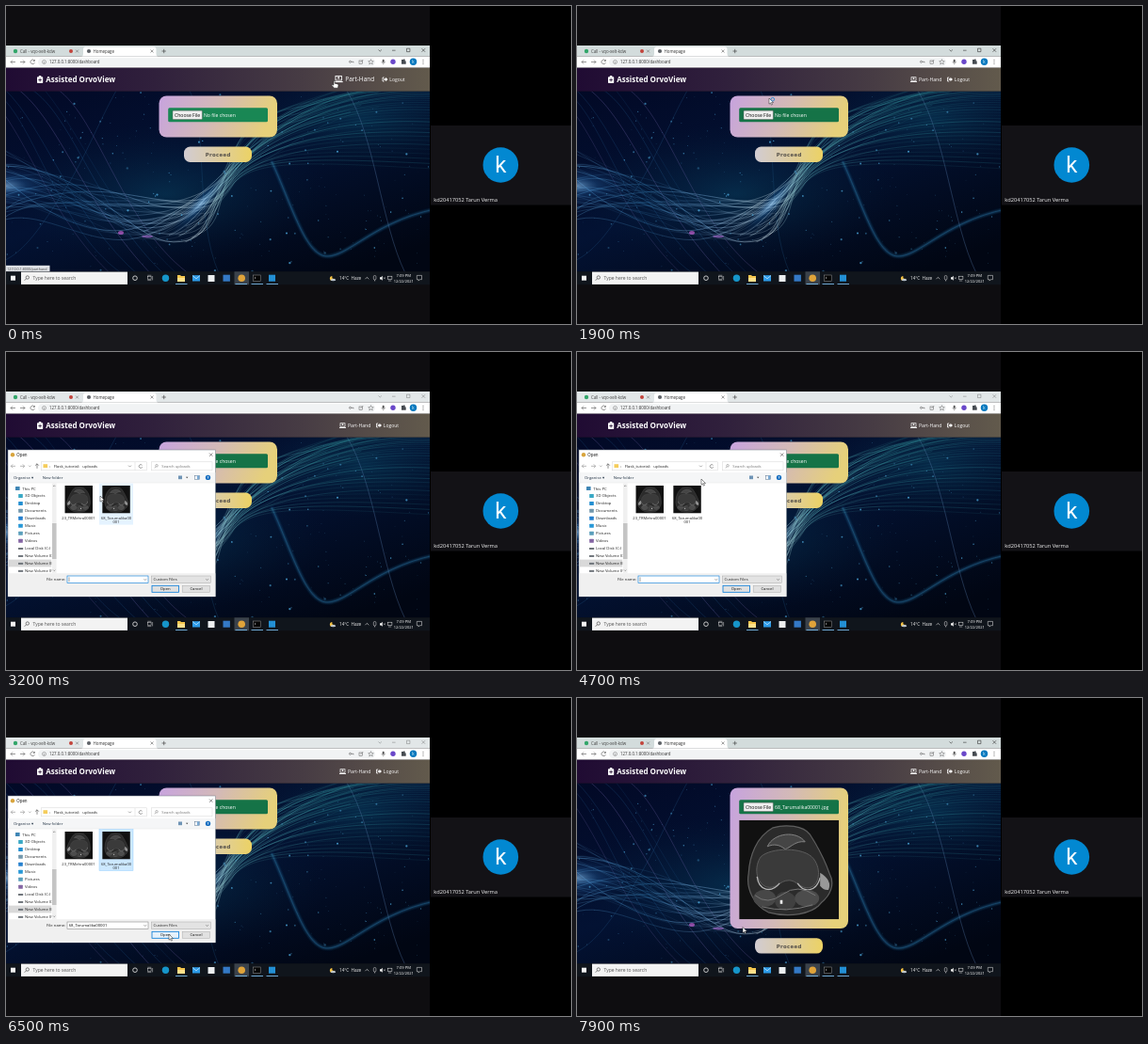
Write an HTML page that moves like this. It is 600 px wide and 338 px high and loops after 8 s.

```html
<!DOCTYPE html>
<html lang="en">
<head>
<meta charset="utf-8">
<title>Upload walkthrough</title>
<style>
html, body { margin: 0; width: 100%; height: 100%; overflow: hidden; background: #000; }
svg { display: block; width: 100vw; height: 100vh; font-family: "Open Sans", "Noto Sans", sans-serif; }
</style>
</head>
<body>
<svg id="stage" viewBox="0 0 600 338" preserveAspectRatio="none"></svg>
<script>
const LOOP = 8000;
const stage = document.getElementById('stage');

// Markup helpers
const rect = (x, y, w, h, fill, more = '') => `<rect x="${x}" y="${y}" width="${w}" height="${h}" fill="${fill}" ${more}/>`;
const disc = (x, y, r, fill, more = '') => `<circle cx="${x}" cy="${y}" r="${r}" fill="${fill}" ${more}/>`;
const oval = (x, y, rx, ry, fill, more = '') => `<ellipse cx="${x}" cy="${y}" rx="${rx}" ry="${ry}" fill="${fill}" ${more}/>`;
const line = (d, color, w = .6, more = '') => `<path d="${d}" fill="none" stroke="${color}" stroke-width="${w}" ${more}/>`;
const shape = (d, fill, more = '') => `<path d="${d}" fill="${fill}" ${more}/>`;
const text = (x, y, size, str, fill = '#222', more = '') => `<text x="${x}" y="${y}" font-size="${size}" fill="${fill}" ${more}>${str}</text>`;
const group = (id, body, more = '') => `<g id="${id}" ${more}>${body}</g>`;
const stops = list => list.map(([o, c, a = 1]) => `<stop offset="${o}" stop-color="${c}" stop-opacity="${a}"/>`).join('');
const fade = (id, list, more = '') => `<linearGradient id="${id}" ${more}>${stops(list)}</linearGradient>`;
const glow = (id, list) => `<radialGradient id="${id}">${stops(list)}</radialGradient>`;
const mid = 'text-anchor="middle"';

let seed = 11;
const rnd = () => (seed = (seed * 16807) % 2147483647) / 2147483647;
const span = (a, b) => +(a + (b - a) * rnd()).toFixed(2);

const defs = `<defs>
${fade('nav', [[0, '#200b33'], [.35, '#30203c'], [.7, '#473c44'], [1, '#625a4c']])}
${fade('card', [[0, '#c7a3de'], [.5, '#d3b9b8'], [1, '#e6d07a']], 'x2="1" y2=".15"')}
${fade('pill', [[0, '#d2ccd2'], [.45, '#dccca6'], [1, '#ecd264']])}
${fade('sky', [[0, '#020926'], [.5, '#031233'], [1, '#010613']], 'x2=".8" y2="1"')}
${fade('strand', [[0, '#5fa8dc'], [.16, '#2f74a8'], [.3, '#7fb4e2'], [.46, '#eafcff'], [.56, '#5cb9c0'], [.75, '#2b8791'], [1, '#1c6378']],
  'gradientUnits="userSpaceOnUse" x1="0" y1="0" x2="450" y2="0"')}
${glow('halo', [[0, '#8cc4f4', .65], [.35, '#2f78c0', .3], [1, '#06255a', 0]])}
${glow('teal', [[0, '#0a4a66', .45], [1, '#062038', 0]])}
<filter id="soft"><feGaussianBlur stdDeviation=".6"/></filter>
<filter id="haze"><feGaussianBlur stdDeviation="1.2"/></filter>
<clipPath id="page">${rect(0, 90.5, 450, 192, '#fff')}</clipPath>
<clipPath id="side">${rect(3, 140, 45.5, 95, '#fff')}</clipPath>
<clipPath id="frame">${rect(0, 0, 106, 105.5, '#fff')}</clipPath>
</defs>`;

function wallpaper() {
  const alpha = (a, b) => `opacity="${span(a, b)}"`;
  let s = rect(0, 90, 450, 193, 'url(#sky)');
  s += oval(170, 200, 170, 75, 'url(#teal)') + oval(380, 120, 130, 55, 'url(#teal)');

  // Faint crossing threads
  for (let i = 0; i < 7; i++) {
    const x = i * 14 - 30;
    s += line(`M${x},88 C${x + 45},${span(110, 150)} ${x + 70},${span(200, 250)} ${x + 145},288`, i % 3 ? '#2a6ca4' : '#8d7cc9', .5, alpha(.25, .6));
  }
  s += line('M118,88 C95,130 85,160 62,196 S20,262 -5,272', '#2f6ea0', .5, 'opacity=".45"');
  s += line('M282,165 C303,210 318,266 341,266 S390,230 455,216', '#1d5a86', 2.6, 'opacity=".65" filter="url(#haze)"');
  s += line('M282,165 C303,210 318,266 341,266 S390,230 455,216', '#2a6f96', .6, 'opacity=".6"');
  s += line('M362,90 C392,140 398,230 424,284', '#5a7fae', .5, 'opacity=".7"');
  s += line('M195,90 C215,130 200,225 226,284', '#24608f', .5, 'opacity=".5"');

  // Main ribbon: loose on both ends, gathered around x = 230
  for (let i = 0; i < 32; i++) {
    const k = i / 31, low = span(206, 252), dip = span(115, 185), knot = 166 + k * 26, end = 88 + k * k * 85;
    s += line(`M-5,${span(150, 230)} C${dip - 90},${span(160, 215)} ${dip - 45},${low} ${dip},${low} S${span(205, 222)},${knot + 32} 240,${knot} S${span(310, 355)},${end - 6} 455,${end}`,
      'url(#strand)', span(.3, .8), alpha(.12, .65));
  }
  for (let i = 0; i < 16; i++) {
    const x = span(140, 205), y = span(225, 252), up = span(88, 125);
    s += line(`M${x},${y} C${x + 30},${y - 12} 222,${span(188, 205)} ${span(240, 262)},${span(150, 178)} S${span(290, 320)},${up + 8} ${span(340, 400)},${up - 10}`,
      'url(#strand)', span(.3, .8), alpha(.2, .65));
  }
  s += oval(0, 191, 62, 24, 'url(#halo)');
  s += oval(207, 210, 46, 10, 'url(#halo)', 'transform="rotate(-48 207 210)"');
  s += oval(122, 241, 3, 2, '#c35fd0', 'opacity=".7" filter="url(#soft)"') + oval(150, 245, 6, 1.5, '#b070d8', 'opacity=".6" filter="url(#soft)"');
  for (let i = 0; i < 280; i++)
    s += disc(span(0, 450), span(91, 282), (.3 + rnd() ** 3 * .9).toFixed(2), '#4aa3d6', alpha(.3, .9));
  return `<g clip-path="url(#page)">${s}</g>`;
}

// Soft cross-section of a knee in a 106 px square
function knee(place) {
  return `<g transform="${place}"><g clip-path="url(#frame)">` + rect(0, 0, 106, 105.5, '#111') + '<g filter="url(#soft)">' +
    shape('M36,8 C50,4 68,6 75,15 C84,29 91,42 96,57 C102,68 97,80 87,88 C78,100 53,104 31,98 C16,91 7,73 10,57 C11,38 18,18 36,8Z', '#2b2b2b', 'stroke="#5e5e5e" stroke-width="1.2"') +
    shape('M30,28 C37,13 61,11 70,23 C60,22 56,28 49,31 C43,26 37,25 30,28Z', '#454545', 'stroke="#8a8a8a" stroke-width=".9"') +
    shape('M23,39 C33,29 69,28 79,41 C88,53 85,70 74,72 C65,73 61,64 53,64 C43,64 39,74 29,71 C17,66 16,49 23,39Z', '#3a3a3a', 'stroke="#5c5c5c" stroke-width="1"') +
    line('M19,60 C21,75 34,78 43,67 M62,67 C69,78 82,76 86,61', '#b5b5b5', 1.3) +
    oval(27, 83, 12, 9, '#474747') + oval(49, 86, 11, 10, '#404040') + oval(72, 83, 13, 9, '#4c4c4c') +
    line('M17,80 Q30,91 46,79 T81,80 M24,92 Q50,99 78,90', '#757575', 1) +
    shape('M86,56 Q99,64 95,74 Q90,75 86,70Z', '#999') + '</g>' +
    rect(43.5, 85, 2.6, 4, '#f0f0f0') + '</g></g>';
}

function browser() {
  let s = group('strip', rect(0, 42, 450, 11.5, '#d3dcdc'));
  s += disc(10, 48, 2.2, '#33a66a') + text(15, 49.8, 4.4, 'Call - vqo-xelt-kdw', '#444');
  s += disc(69, 48, 2, '#c2443b') + line('M74,46.5l3,3m0,-3l-3,3', '#555', .5);
  s += shape('M80,53.5 Q82,53.5 82,51 V46 Q82,43.5 84.5,43.5 H157 Q159.5,43.5 159.5,46 V51 Q159.5,53.5 161.5,53.5Z', '#fff');
  s += disc(88, 48, 2.1, '#5f6368') + text(92.5, 49.7, 4.4, 'Homepage', '#333') + line('M153.5,46.5l3,3m0,-3l-3,3', '#444', .5);
  s += line('M165.5,48h4.4m-2.2,-2.2v4.4', '#333', .6);
  s += group('controls', line('M395.5,46.5l1.7,1.6l1.7,-1.6 M410,47.2h3.6 M425.5,45.2h3.4v3.4h-3.4z M441.5,45.2l3.6,3.6m0,-3.6l-3.6,3.6', '#333', .6));
  s += rect(0, 53.5, 450, 12.2, '#fff') + rect(34, 55.2, 358, 8.8, '#f1f3f4', 'rx="4.4"');
  s += line('M10,59.5H5m2,-2l-2,2l2,2 M15,59.5h5m-2,-2l2,2l-2,2', '#555', .6);
  s += line('M30.2,58a2.3,2.3 0 1 0 .3,2.2 M30.4,56.9v1.6h-1.6', '#555', .6);
  s += disc(40.5, 59.5, 2, 'none', 'stroke="#666" stroke-width=".5"') + line('M40.5,59v1.7', '#666', .5);
  s += text(46, 61.2, 4.4, '127.0.0.1:8000/dashboard', '#333');
  s += disc(365.5, 59.3, 1, 'none', 'stroke="#555" stroke-width=".6"') + line('M366.5,59.3h2.5v1', '#555', .6);
  s += rect(375, 58, 3.3, 3.3, 'none', 'stroke="#555" stroke-width=".5"') + line('M376.5,60l2.8,-3', '#555', .5);
  s += shape('M387.5,56.7l.8,1.9 2,.1 -1.6,1.3 .6,2 -1.8,-1.1 -1.8,1.1 .6,-2 -1.6,-1.3 2,-.1Z', 'none', 'stroke="#555" stroke-width=".45"');
  s += rect(399.7, 56.7, 2, 3.4, '#555', 'rx="1"') + line('M398.9,59a1.8,1.8 0 0 0 3.6,0 M400.7,61v1.3', '#555', .45);
  s += disc(411, 59.3, 2.7, '#6a48c9') + shape('M420,57h2a1,1 0 0 1 1.7,0v1.4h1v3.4h-4.7z', '#454a50');
  s += disc(432.5, 59.3, 3.7, '#0277bd') + text(432.5, 60.9, 4.4, 'k', '#fff', mid);
  s += disc(443, 57.3, .5, '#444') + disc(443, 59.3, .5, '#444') + disc(443, 61.3, .5, '#444');
  return s;
}

function navbar() {
  return rect(0, 65.7, 450, 24.9, 'url(#nav)') +
    rect(33, 75.2, 6.2, 6.8, '#fff', 'rx=".8"') + rect(34.8, 73.9, 2.6, 1.8, '#fff', 'rx=".5"') + line('M36.1,76.8v3.6m-1.8,-1.8h3.6', '#332040', .9) +
    text(42.3, 81.2, 8, 'Assisted OrvoView', '#fff', 'font-weight="700"') +
    group('modeLink', rect(1, -4.6, 5, 3.6, 'none', 'stroke="#fff" stroke-width=".7"') + disc(3.5, -3.1, .9, '#fff') +
      line('M0,.2h7', '#fff', .9) + text(9, 0, 5.1, 'Part-Hand', '#fff')) +
    group('exitLink', line('M2.2,-4.3h-1.7v4h1.7', '#fff', .8) + shape('M1.7,-3h1.8v-1.5l2.5,2.2 -2.5,2.2v-1.5h-1.8z', '#fff') + text(7.8, 0, 5, 'Logout', '#fff'));
}

function form() {
  return `<rect id="panel" x="162.5" y="95.5" width="125.5" height="44" rx="8" fill="url(#card)"/>` +
    `<rect id="bar" x="172.2" y="108.3" width="105.8" height="15" rx="1.5"/>` +
    rect(177, 111.2, 31.3, 9.3, '#efefef', 'stroke="#666" stroke-width=".5" rx=".7"') +
    text(192.6, 117.8, 5.1, 'Choose File', '#111', mid) +
    `<text id="picked" x="210" y="117.8" font-size="5.1" fill="#fff"></text>` +
    group('scan', knee('translate(172.2 129.8)')) +
    group('proceed', rect(189, 149.6, 72, 16.4, 'url(#pill)', 'rx="6.5"') +
      text(225.2, 160, 5.4, 'Proceed', '#55504a', `${mid} font-weight="700" letter-spacing=".3" style="font-family:'DejaVu Sans',sans-serif"`));
}

function taskbar() {
  let s = rect(0, 282.3, 450, 13.9, '#10151c');
  s += rect(5, 286.7, 5, 5, '#f4f4f4');
  s += rect(16, 282.6, 113, 13.3, '#f3f3f3') + disc(22.8, 288.5, 1.7, 'none', 'stroke="#333" stroke-width=".6"') + line('M21.5,289.8l-1.8,1.9', '#333');
  s += text(28.5, 291, 5, 'Type here to search', '#555');
  s += disc(137, 289.2, 2.3, 'none', 'stroke="#eee" stroke-width=".8"');
  s += rect(150.5, 287.6, 3.6, 2.6, 'none', 'stroke="#ddd" stroke-width=".5"') + line('M150.3,286.3h4M150.3,291.6h4M155.6,287v4.4', '#ddd', .5);
  s += disc(169.5, 289.2, 3.7, '#1695c9');
  s += shape('M182,286h3l1,1h4v6h-8z', '#f4c64e') + rect(182, 289, 8, 4, '#ffe08a');
  s += rect(198, 286.2, 8, 6.3, '#2d9be8') + line('M198,286.5l4,3.3l4,-3.3', '#d9efff', .7);
  s += rect(214.5, 286, 7, 7, '#eceff1') + rect(230.5, 285.7, 7.4, 7, '#3479c5');
  s += rect(242.5, 282.3, 15.5, 13.9, '#3b424b') + disc(250.2, 289.2, 3.8, '#e0a33a');
  s += rect(262.6, 286, 7.6, 6.4, '#050505', 'stroke="#999" stroke-width=".5"') + line('M264,288l1.2,1l-1.2,1', '#eee', .5);
  s += rect(279, 285.7, 7, 7, '#238fd4');
  for (const x of [180, 243.5, 260.5, 276.5]) s += rect(x, 295.1, 12.5, .9, '#79b9e8');
  s += disc(346.5, 289.5, 2.6, '#f6c344') + disc(348.2, 288, 2, '#10151c') + oval(347.5, 291.2, 2.7, 1.1, '#bcc6d1');
  s += text(354, 291, 4.6, '14°C&#160; Haze', '#f2f2f2');
  s += line('M381.5,290.2l1.9,-1.9l1.9,1.9', '#eee', .6);
  s += rect(390.3, 286.5, 2.6, 4.5, 'none', 'rx="1.2" stroke="#eee" stroke-width=".5"') + line('M391.6,291v1.5', '#eee', .5);
  s += shape('M397,288.2h1.3l1.5,-1.4v5l-1.5,-1.4h-1.3z', '#eee') + line('M401,288.4l1.8,1.8m0,-1.8l-1.8,1.8', '#eee', .45);
  s += rect(405.3, 287.2, 4.6, 3.3, 'none', 'stroke="#eee" stroke-width=".5"') + line('M406,292h3.2', '#eee', .5);
  s += text(422.3, 287.8, 4.2, '7:09 PM', '#fff', mid) + text(422.3, 293.6, 4, '12/22/2021', '#fff', mid);
  s += shape('M436.3,286.4h5.2v4.3h-2.1l-1.3,1.4v-1.4h-1.8z', 'none', 'stroke="#eee" stroke-width=".5"');
  return s;
}

function dialog() {
  const small = 4.25;
  let s = rect(2, 104, 220.5, 156, '#fff', 'stroke="#6f7a82" stroke-width=".5"');
  s += disc(7, 109.3, 2.2, '#d8a43c') + text(11.3, 111, 4.4, 'Open', '#111') + line('M216,107.5l3.4,3.4m0,-3.4l-3.4,3.4', '#222', .5);
  s += line('M10,121.3H5.3m1.9,-1.9l-1.9,1.9l1.9,1.9 M15,121.3h4.7m-1.9,-1.9l1.9,1.9l-1.9,1.9', '#888', .6);
  s += line('M24,120.6l1.3,1.3l1.3,-1.3', '#777', .5) + line('M33,123.8v-5m-1.9,1.9l1.9,-1.9l1.9,1.9', '#444', .6);
  s += rect(37.5, 116.8, 112, 9, '#fff', 'stroke="#d5d5d5" stroke-width=".5"') + rect(39.5, 119.2, 4.6, 3.8, '#f5cd5b');
  s += text(46, 122.8, small, '›', '#555') + text(50.8, 122.8, small, 'Flask_tutorial') + text(77, 122.8, small, '›', '#555') + text(81.3, 122.8, small, 'uploads');
  s += line('M130,120.6l1.5,1.5l1.5,-1.5', '#555', .5) + line('M137,117v8.6', '#d5d5d5', .5) + line('M144.5,120.4a1.8,1.8 0 1 0 .2,1.8', '#444', .55);
  s += rect(154.5, 116.8, 64.5, 9, '#fff', 'stroke="#d5d5d5" stroke-width=".5"') + disc(160, 120.8, 1.3, 'none', 'stroke="#777" stroke-width=".5"') + line('M159,121.9l-1.3,1.4', '#777', .5);
  s += text(165.3, 122.8, small, 'Search uploads', '#777');
  s += rect(2.3, 128, 220, 11, '#f5f6f7') + line('M2.3,139h220', '#dedede', .4);
  s += text(8, 135, small, 'Organise ▾', '#223344') + text(38.7, 135, small, 'New folder', '#223344');
  s += rect(183, 131.5, 4, 3.7, '#6f94b5') + shape('M191,132.8h2.4l-1.2,1.4z', '#444');
  s += rect(200.3, 131.3, 5, 4, '#fff', 'stroke="#54708b" stroke-width=".5"') + rect(203, 131.3, 2.3, 4, '#79a8d3');
  s += disc(214.5, 133.4, 2.7, '#176fc1') + text(214.5, 135, 4.2, '?', '#fff', mid + ' font-weight="700"');

  const places = ['This PC', '3D Objects', 'Desktop', 'Documents', 'Downloads', 'Music', 'Pictures', 'Videos', 'Local Disk (C:)', 'New Volume (D:)', 'New Volume (E:)', 'New Volume (F:)'];
  const tints = ['#3f86b5', '#38a8c5', '#238ed1', '#7297ac', '#2680ce', '#2798d7', '#5a9ebb', '#8465a3'];
  const list = places.map((name, i) => {
    const y = 145 + i * 7.95;
    return (i === 10 ? rect(2.5, y - 3.9, 46, 7.8, '#d9d9d9') : '') +
      (i < 8 ? rect(i ? 13.2 : 10, y - 2, 4.6, 4, tints[i], 'rx=".5"') : rect(13, y - .6, 5.2, 2, '#70767c')) +
      text(i ? 20 : 17.3, y + 1.5, small, name);
  }).join('');
  s += `<g clip-path="url(#side)">${list}</g>`;
  s += rect(49, 139.5, 4.5, 95.5, '#f0f0f0') + rect(49, 182, 4.5, 38, '#c4c4c4') + line('M50,143l1.2,-1.2l1.2,1.2M50,231.5l1.2,1.2l1.2,-1.2', '#555', .5);

  s += `<rect id="tile" x="99" y="139.6" width="36" height="44" stroke-width=".5"/>`;
  s += knee('translate(92 142) scale(-.28 .28)') + knee('translate(102.2 142) scale(.28)');
  s += text(77, 177.6, 4.1, '23_TRMehra00001', '#222', mid) + text(117, 177.6, 4.1, '68_Tarumalika00', '#222', mid) + text(117, 182.3, 4.1, '001', '#222', mid);

  s += rect(2.3, 235.2, 220, 24.6, '#f0f0f0') + text(63.3, 243.4, small, 'File name:', '#222', 'text-anchor="end"');
  s += `<rect id="field" x="65" y="238" width="86" height="7.6" fill="#fff" stroke-width=".6"/>`;
  s += `<rect id="mark" x="66.3" y="239" width="37" height="5.6" fill="#0875d1"/>`;
  s += `<text id="entry" x="66.7" y="243.3" font-size="${small}"></text>` + line('M67,239.4v4.8', '#111', .4, 'id="caret"');
  s += line('M146.5,241.2l1.3,1.3l1.3,-1.3', '#444', .5);
  s += rect(154.3, 238, 63, 7.6, '#e3e3e3', 'stroke="#aaa" stroke-width=".5"') + text(156.5, 243.3, small, 'Custom Files') + line('M212.3,241.2l1.3,1.3l1.3,-1.3', '#444', .5);
  s += `<rect id="ok" x="155" y="248.3" width="28.5" height="7" stroke="#0078d7" stroke-width=".8"/>` + text(169.2, 253.3, small, 'Open', '#111', mid);
  s += rect(187.5, 248.3, 29, 7, '#e1e1e1', 'stroke="#adadad" stroke-width=".5"') + text(202, 253.3, small, 'Cancel', '#111', mid);
  return group('dialog', s);
}

const caller = rect(450, 0, 150, 338, '#000') + rect(451, 127, 149, 84.5, '#131216') + disc(525.3, 169, 18.8, '#0288d1') +
  text(525.3, 177.3, 24, 'k', '#fff', `${mid} style="font-family:Roboto,sans-serif"`) +
  text(454.3, 207.8, 5.7, 'kd20417052 Tarun Verma', '#f1f1f1');

const pointer = group('pointer',
  group('arrow', shape('M0,0V6.2L1.5,4.9 2.4,7.1 3.5,6.6 2.5,4.5H4.5Z', '#fff', 'stroke="#111" stroke-width=".45"')) +
  group('hand', shape('M0,0q1,-.6 1.2,.5v2.2l3,.7q.9,.3.8,1.3l-.5,3h-4l-2.6,-3q0,-1 1,-.7l1,.7z', '#fff', 'stroke="#111" stroke-width=".5"')) +
  group('busy', disc(3.8, 1.2, 1.8, 'none', 'stroke="#3c8fd0" stroke-width="1"')));

stage.innerHTML = defs + rect(0, 0, 450, 338, '#0e0d10') + wallpaper() + browser() + navbar() + form() +
  group('status', rect(0, 275.8, 46.5, 6.6, '#dfe2e6') + text(1.2, 280.6, 3.7, '127.0.0.1:8000/parthand', '#444')) +
  dialog() + taskbar() + caller + pointer;

const el = {};
stage.querySelectorAll('[id]').forEach(n => el[n.id] = n);

const set = (node, attrs) => { for (const k in attrs) node.setAttribute(k, attrs[k]); };
const show = (node, on) => node.setAttribute('visibility', on ? 'inherit' : 'hidden');
const clamp = v => Math.max(0, Math.min(1, v));
const ease = v => v * v * (3 - 2 * v);
const ramp = (t, a, b) => ease(clamp((t - a) / (b - a)));
const mix = (a, b, k) => a + (b - a) * k;

// Pointer stops: time, x, y
const route = [[0, 348, 79.5], [100, 348, 79.5], [900, 196, 114], [1500, 196, 114], [1900, 204, 98], [2400, 204, 98],
  [3100, 100, 153], [3600, 100, 153], [4000, 104, 128], [4200, 104, 128], [4700, 132, 135], [5150, 118, 158],
  [5600, 118, 158], [6400, 173, 251], [7200, 173, 251], [7300, 172.5, 250.5], [7600, 172.5, 250.5], [7900, 176, 243.5], [LOOP, 176, 243.5]];

function pointAt(t) {
  const i = route.findIndex((p, n) => n && t <= p[0]);
  const [a, b] = [route[i - 1], route[i]];
  const k = ramp(t, a[0], b[0]);
  return [mix(a[1], b[1], k), mix(a[2], b[2], k)];
}

function draw(t) {
  const [x, y] = pointAt(t);
  const link = t < 250;
  set(el.pointer, { transform: `translate(${x} ${y})` });
  show(el.hand, link);
  show(el.arrow, !link);
  show(el.busy, t >= 1500 && t < 2200);

  const hover = 1 - ramp(t, 200, 500);
  set(el.modeLink, { transform: `translate(${mix(354, 348.7, hover)} 80.3) scale(${mix(1, 1.28, hover)})` });
  set(el.exitLink, { transform: `translate(${mix(393, 399.5, hover)} 80.3)` });
  show(el.status, t < 600);

  const loaded = t >= 7600;
  set(el.bar, { fill: t < 1300 ? '#198754' : '#157347' });
  el.picked.textContent = loaded ? '68_Tarumalika00001.jpg' : 'No file chosen';
  set(el.panel, { height: loaded ? 149.5 : 44 });
  set(el.proceed, { transform: `translate(0 ${loaded ? 105.6 : 0})` });
  show(el.scan, loaded);

  const enter = ramp(t, 2150, 2350), leave = clamp((t - 7200) / 140);
  const open = t > 2150 && t < 7400;
  const size = leave ? 1 - .05 * leave : mix(.95, 1, enter);
  show(el.dialog, open);
  set(el.dialog, { opacity: enter * (1 - leave), transform: `translate(112 182) scale(${size}) translate(-112 -182)` });
  const inactive = open && t < 7200;
  set(el.strip.firstChild, { fill: inactive ? '#e2e7e8' : '#d3dcdc' });
  set(el.controls, { opacity: inactive ? .5 : 1 });

  const chosen = t >= 5300;
  const over = x >= 99 && x <= 135 && y >= 139.6 && y <= 183.6;
  set(el.tile, { fill: chosen ? '#cce8ff' : over ? '#e5f3ff' : 'none', stroke: chosen ? '#99d1ff' : 'none' });
  el.entry.textContent = chosen ? '68_Tarumalika00001' : '';
  set(el.entry, { fill: leave ? '#fff' : '#111' });
  set(el.field, { stroke: chosen ? '#8b8b8b' : '#0078d7' });
  show(el.mark, leave > 0);
  show(el.caret, !chosen && t % 1060 < 530);
  set(el.ok, { fill: y > 248 && x > 155 ? '#e5f1fb' : '#e1e1e1' });
}

const start = performance.now();
function tick() {
  draw((performance.now() - start) % LOOP);
  requestAnimationFrame(tick);
}
tick();
</script>
</body>
</html>
```
